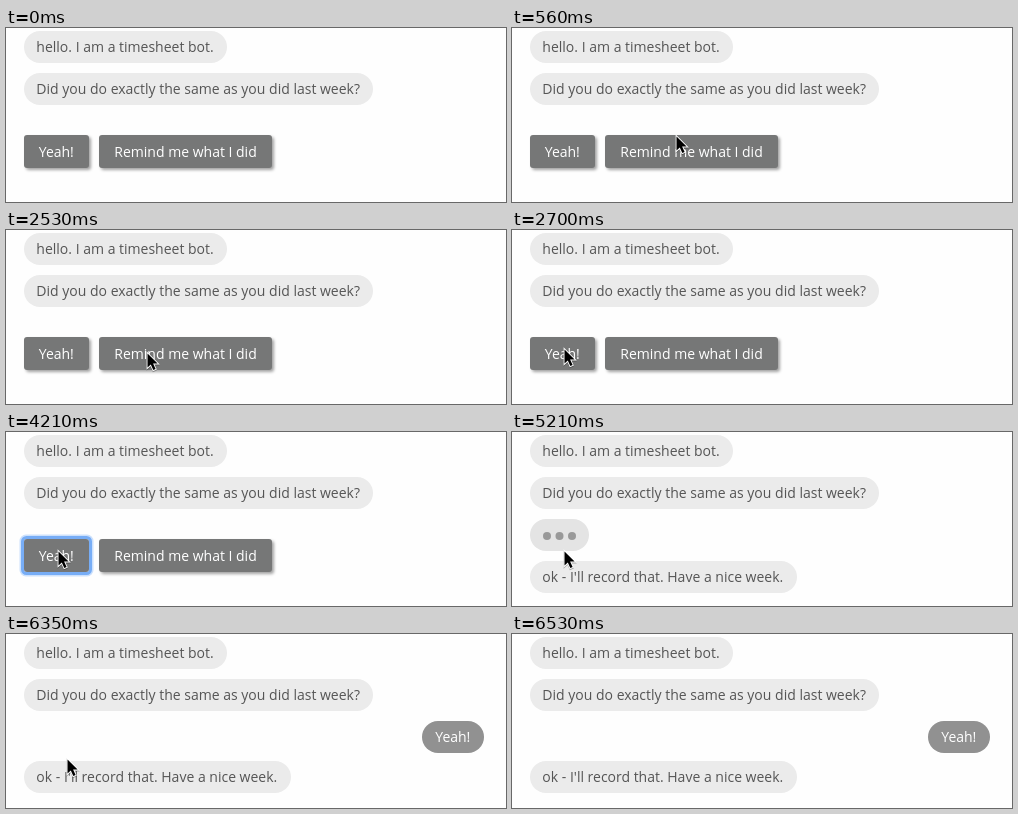
These frames come from a looping animation (500 by 174 pixels, 8 s). An HTML page:

```html
<!DOCTYPE html>
<html lang="en">
<head>
<meta charset="utf-8">
<title>Timesheet bot</title>
<style>
  html, body { margin: 0; width: 100%; height: 100%; overflow: hidden; background: #fefefe; }
  svg { display: block; }
  text { font: 14px "Open Sans", sans-serif; fill: #555; }
  .light { fill: #fff; }
  .button { fill: #767777; }
  .shadow { filter: drop-shadow(2px 2px 1.5px rgba(0, 0, 0, .36)); }
  .mid { text-anchor: middle; }
</style>
</head>
<body>
<svg width="500" height="174" viewBox="0 0 500 174">
  <g id="chat"></g>
  <g id="buttons">
    <g id="ring" fill="none" stroke="#5b9df5">
      <rect x="16" y="105" width="69" height="37" rx="4" stroke-width="5" opacity=".3"/>
      <rect x="16.5" y="105.5" width="68" height="36" rx="4" stroke-width="3" opacity=".75"/>
    </g>
    <rect id="yes" class="button" x="18" y="107" width="65" height="33" rx="3"/>
    <text class="light mid" x="50.3" y="129">Yeah!</text>
    <rect class="button shadow" x="93" y="107" width="173" height="33" rx="3"/>
    <text class="light mid" x="179.5" y="129">Remind me what I did</text>
  </g>
  <g id="typing">
    <rect x="18" y="87" width="59" height="32" rx="16" fill="#e4e4e4"/>
    <g fill="#999">
      <circle cx="35" cy="104" r="4"/><circle cx="47.5" cy="104" r="4"/><circle cx="60" cy="104" r="4"/>
    </g>
  </g>
  <g id="answer">
    <rect x="416" y="87" width="62" height="32" rx="16" fill="#919191"/>
    <text class="light mid" x="446.8" y="108">Yeah!</text>
  </g>
  <g id="reply"></g>
  <path id="cursor" d="M1.5 1.5V15.6l3.3-3.1 2.5 5.6 2.3-1-2.5-5.5h4.5z"
        stroke="#fff" stroke-width="1.8" paint-order="stroke"
        style="filter: drop-shadow(0 1px .6px rgba(0, 0, 0, .3))"/>
</svg>
<script>
const LOOP = 8000, FOCUS = 4210, SENT = 5210, ANSWERED = 5270;
const $ = id => document.getElementById(id);
const show = (id, on) => $(id).style.display = on ? '' : 'none';
const bubble = (y, width, words) =>
  `<rect x="18" y="${y}" width="${width}" height="32" rx="16" fill="#ebebeb"/>
   <text x="30.3" y="${y + 21}">${words}</text>`;

$('chat').innerHTML = bubble(3, 203, 'hello. I am a timesheet bot.')
  + bubble(45, 349, 'Did you do exactly the same as you did last week?');
$('reply').innerHTML = bubble(127, 267, "ok - I'll record that. Have a nice week.");

// Pointer positions: time, x, y; it jumps between them
const pointer = [
  [500, 160, 125], [560, 163, 107], [860, 166, 114], [910, 165, 123],
  [2530, 140, 122], [2590, 96, 120], [2640, 66, 119], [2700, 51, 118],
  [6350, 60, 124], [6410, 84, 140], [6470, 114, 162], [6530, -40, 0]
];

function draw(t) {
  const sent = t >= SENT, answered = t >= ANSWERED, focused = t >= FOCUS;
  show('buttons', !sent);
  show('ring', focused);
  $('yes').classList.toggle('shadow', !focused);
  show('typing', sent && !answered);
  show('answer', answered);
  show('reply', sent);
  $('reply').setAttribute('transform', `translate(0 ${answered ? 0 : 2})`);
  const [, x, y] = pointer.findLast(p => p[0] <= t) || [0, -40, 0];
  $('cursor').setAttribute('transform', `translate(${x} ${y})`);
}

function tick() {
  draw(performance.now() % LOOP);
  requestAnimationFrame(tick);
}
tick();
</script>
</body>
</html>
```
